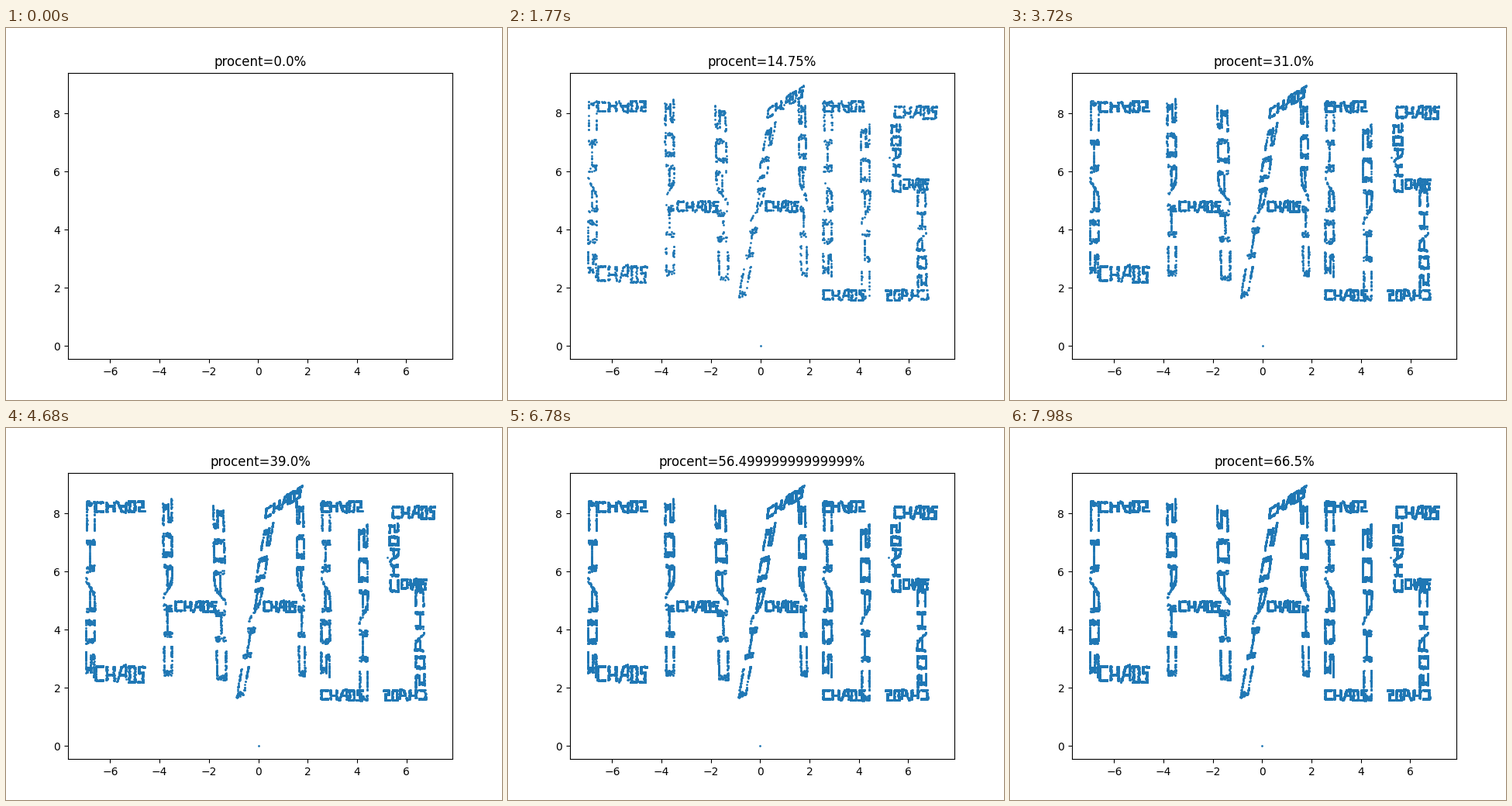
A matplotlib script that plays this animation: 640x480 px, repeating every 8000 ms.

```python
import random

import matplotlib.pyplot as plt
import numpy as np
from matplotlib.animation import FuncAnimation

TOTAL = 40000
BATCH = 100
STEP_MS = 30
TICK_MS = 20
LOOP_MS = 8000

THIN = 0.053
TALL = 0.429
TOP, MID = 8.513, 4.536
BASE = 10 - TOP
HIGH, LOW = 5.43, 4.57


# A stroke sends the point x + yj to centre + x * along + y * across.
def stroke(centre, along, across):
    return centre, along, across


def bar(x, y, length, thick=THIN):
    return stroke(complex(x, y), length, thick * 1j)


def stem(x, y, length, thick=THIN):
    return stroke(complex(x, y), length * 1j, thick)


LETTER_C = [
    stem(-7.083, HIGH, -TALL),
    bar(-5.619, TOP, 0.143, -THIN),
    bar(-5.619, 2.057, 0.143, 0.083),
]
LETTER_H = [
    stem(-3.952, HIGH, TALL),
    bar(-2.555, MID, 0.119),
    stroke(-1.226 + 5.235j, -0.0124 + 0.4238j, -0.065 + 0.0019j),
]
LETTER_A = [
    stroke(-0.421 + 4.569j, 0.0852 + 0.4204j, 0.0506 + 0.0157j),
    stroke(0.976 + 8.113j, 0.1044 + 0.0571j, 0.0053 + 0.0527j),
    stroke(1.934 + 5.37j, -0.0081 + 0.4239j, -0.0418 + 0.0042j),
    bar(0.861, MID, 0.093),
]
LETTER_O = [
    stem(2.447, HIGH, -TALL),
    bar(3.363, TOP, 0.119, -THIN),
    bar(3.363, BASE, 0.119),
    stem(3.972, LOW, TALL),
]
S_SPINE = stem(5.215, 6.483, 0.167)
LETTER_S = [
    bar(6.275, 7.716, 0.124, 0.063),
    S_SPINE,
    bar(6.279, 5.298, 0.071),
    stem(6.805, 3.714, -0.238, -THIN),
    bar(5.941, BASE, -0.121),
]
WORD = LETTER_C + LETTER_H + LETTER_A + LETTER_O + LETTER_S


def chaos_game(count, seed=4):
    rng = random.Random(seed)
    z = 0j
    points = [z]
    pick = S_SPINE
    while len(points) < count:
        centre, along, across = pick
        z = centre + z.real * along + z.imag * across
        points.append(z)
        pick = rng.choice(WORD)
    return np.array(points)


def limits_so_far(values, margin=0.05):
    low = np.minimum.accumulate(values)
    high = np.maximum.accumulate(values)
    pad = (high - low) * margin
    return np.column_stack([low - pad, high + pad])


points = chaos_game(TOTAL)
xs, ys = points.real, points.imag
xlims, ylims = limits_so_far(xs), limits_so_far(ys)

fig, ax = plt.subplots(figsize=(6.4, 4.8), dpi=100)
dots, = ax.plot([], [], "o", color="C0", markersize=1)
title = ax.set_title("procent=0.0%")


def update(frame):
    step = (frame * TICK_MS + TICK_MS // 2) // STEP_MS
    shown = step * BATCH
    dots.set_data(xs[:shown], ys[:shown])
    # Limits follow the visible points; the empty plot spans all of them.
    ax.set_xlim(xlims[shown - 1])
    ax.set_ylim(ylims[shown - 1])
    title.set_text(f"procent={shown / TOTAL * 100}%")
    return dots, title


anim = FuncAnimation(fig, update, frames=LOOP_MS // TICK_MS,
                     interval=TICK_MS, repeat=True, repeat_delay=0)
plt.show()
```
